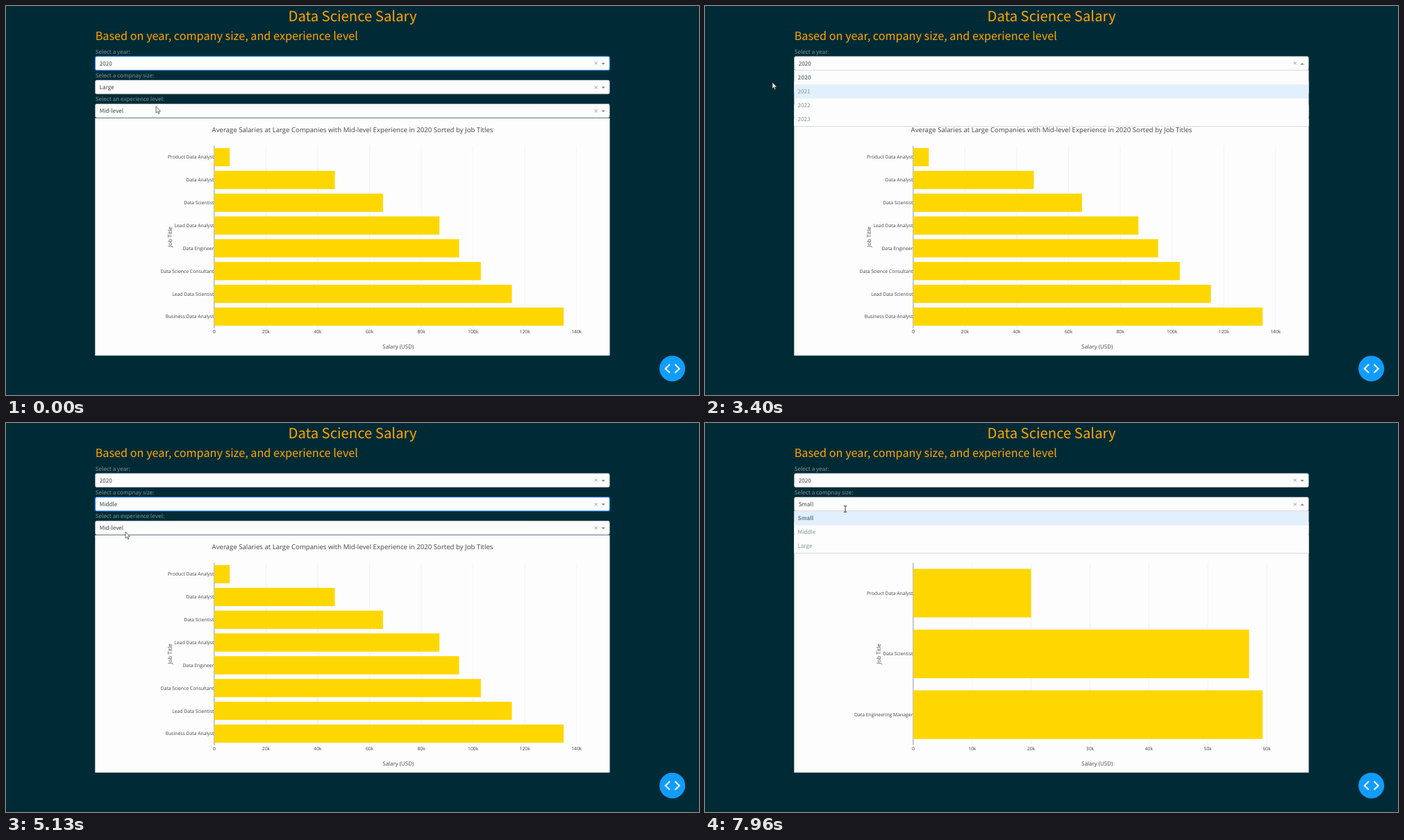
Recreate the animation shown at these times as an HTML page. Size 998 px wide and 561 px high, loop 8 s.

```html
<!DOCTYPE html>
<html lang="en">
<head>
<meta charset="utf-8">
<title>Salary dashboard</title>
<style>
  html, body { margin: 0; width: 100%; height: 100%; overflow: hidden; background: #002b36; }
  svg { display: block; width: 100%; height: 100%; }
  text { text-rendering: geometricPrecision; white-space: pre; }
  .page { font-family: "Noto Sans CJK JP", "Noto Sans CJK SC", "Noto Sans CJK", "Noto Sans", sans-serif; font-size: 8.12px; }
  .heading { fill: #ffa500; }
  .label, .option { fill: #839496; }
  .chosen { fill: #6c7f87; font-weight: 700; }
  .value { fill: #3c4347; }
  .chart { font-family: "Open Sans", sans-serif; font-size: 6.8px; fill: #444; }
  .middle { text-anchor: middle; }
  .end { text-anchor: end; }
</style>
</head>
<body>
<svg viewBox="0 0 998 561">
  <g id="scene"></g>
  <g id="cursor"></g>
</svg>
<script>
const LOOP = 8000;
const LEFT = 128.3, WIDTH = 741.2, RIGHT = LEFT + WIDTH;
const CONTROL_HEIGHT = 20.4, OPTION_HEIGHT = 20.1;
const WHITE = '#fdfdfd';

const selects = [
  { key: 'year', label: 'Select a year:', top: 72.5, options: ['2020', '2021', '2022', '2023'] },
  { key: 'size', label: 'Select a compnay size:', top: 106.75, options: ['Small', 'Middle', 'Large'] },
  { key: 'level', label: 'Select an experience level:', top: 141, options: ['Mid-level'] }
];

// Bars are [job title, average salary in thousands], top to bottom.
const charts = {
  Large: { step: 20, titleX: 239, bars: [
    ['Product Data Analyst', 6], ['Data Analyst', 46.6], ['Data Scientist', 65.2],
    ['Lead Data Analyst', 87], ['Data Engineer', 94.6], ['Data Science Consultant', 103],
    ['Lead Data Scientist', 115], ['Business Data Analyst', 135]] },
  Middle: { step: 20, titleX: 253, bars: [
    ['Data Analyst', 34], ['Data Scientist', 59], ['Data Engineer', 71],
    ['Research Scientist', 88], ['Lead Data Engineer', 104]] },
  Small: { step: 10, titleX: 253, bars: [
    ['Product Data Analyst', 20], ['Data Scientist', 57], ['Data Engineering Manager', 59.3]] }
};

const events = [
  [0, { year: '2020', size: 'Large', level: 'Mid-level', chart: 'Large', focus: 'year', open: false, hover: '' }],
  [2050, { open: true, hover: '2020' }],
  [2760, { hover: '2021' }],
  [3520, { open: false, focus: '' }],
  [3960, { focus: 'size', open: true, hover: 'Large' }],
  [4780, { hover: 'Middle' }],
  [5030, { size: 'Middle', open: false }],
  [5270, { chart: 'Middle' }],
  [5960, { open: true, hover: 'Middle' }],
  [6140, { hover: 'Small' }],
  [6330, { size: 'Small', open: false }],
  [6530, { chart: 'Small' }],
  [7760, { open: true, hover: 'Small' }]
];

// Pointer path: [time, x, y]
const path = [
  [0, 216, 145], [860, 222, 138], [1600, 249, 86], [2300, 248, 86], [2800, 205, 118],
  [3350, 97, 110], [3480, 97, 110], [3920, 184, 116], [4500, 184, 116], [4900, 173, 156],
  [5130, 172, 157], [5300, 178, 205], [5700, 178, 205], [5920, 182, 118], [6020, 182, 118],
  [6200, 184, 136], [6400, 184, 138], [6630, 185, 144], [7360, 190, 146], [7700, 202, 124], [8000, 202, 124]
];

const text = (x, y, content, cls = '', extra = '') =>
  `<text x="${x}" y="${y}" class="${cls}" ${extra}>${content}</text>`;
const rect = (x, y, w, h, fill, extra = '') =>
  `<rect x="${x}" y="${y}" width="${w}" height="${h}" fill="${fill}" ${extra}/>`;
const line = (x1, y1, x2, y2, stroke, width = 0.57) =>
  `<path d="M${x1} ${y1}L${x2} ${y2}" stroke="${stroke}" stroke-width="${width}"/>`;
const size = px => `style="font-size:${px}px"`;

function drawChart(name, year) {
  const { step, titleX, bars } = charts[name];
  const x0 = 299.9, top = 201.6, bottom = 464.4, plotWidth = 529.7;
  const max = Math.max(...bars.map(bar => bar[1])) / 0.95;
  const toX = value => x0 + value / max * plotWidth;
  const pitch = (bottom - top) / bars.length;
  let out = rect(LEFT, 161.8, WIDTH, 342.4, WHITE);
  out += text(499, 181.7, `Average Salaries at ${name} Companies with Mid-level Experience in ${year} Sorted by Job Titles`, 'middle', size(9.64));
  for (let value = 0; value < max; value += step) {
    const x = toX(value);
    out += line(x, top, x, bottom, value ? '#eaeaea' : '#444');
    out += text(x, 471.5, value ? value + 'k' : '0', 'middle');
  }
  bars.forEach(([job, salary], i) => {
    const center = top + pitch * (i + 0.5);
    out += rect(x0 + 0.2, center - pitch * 0.4, toX(salary) - x0 - 0.2, pitch * 0.8, '#ffd700');
    out += text(299.3, center + 2.4, job, 'end');
  });
  out += text(564.8, 493.8, 'Salary (USD)', 'middle', size(7.93));
  out += text(0, 0, 'Job Title', 'middle', `transform="translate(${titleX} 333) rotate(-90)" ${size(7.93)}`);
  return `<g class="chart">${out}</g>`;
}

function drawSelect(select, state) {
  const { key, label, top, options } = select;
  const focused = state.focus === key, open = focused && state.open;
  const mid = top + 10.3;
  let out = text(128.7, top - 3.9, label, 'label');
  if (focused && !open)
    out += rect(LEFT - 0.8, top - 0.8, WIDTH + 1.6, CONTROL_HEIGHT + 1.6, '#0b4a86', 'rx="2.8"');
  out += rect(LEFT + 0.3, top + 0.3, WIDTH - 0.6, CONTROL_HEIGHT - 0.6, WHITE,
    `rx="2.1" stroke="${focused && !open ? '#007eff' : '#ccc'}" stroke-width=".6"`);
  out += text(134.7, top + 13.2, state[key], 'value');
  out += text(849.7, mid + 3.6, '×', 'middle', 'style="font:10.2px \'Open Sans\',sans-serif;fill:#999"');
  out += `<path d="M857.3 ${open ? mid + 1.9 : mid - 0.9}h5.6l-2.8 ${open ? -2.8 : 2.8}z" fill="#888"/>`;
  return out;
}

function drawMenu({ key, top, options }, state) {
  const start = top + CONTROL_HEIGHT;
  const height = options.length * OPTION_HEIGHT + 0.4;
  let out = rect(LEFT, start - 0.5, WIDTH, height + 0.5, WHITE);
  options.forEach((option, i) => {
    const y = start + i * OPTION_HEIGHT;
    if (option === state.hover) out += rect(LEFT + 0.5, y + 0.2, WIDTH - 1, OPTION_HEIGHT, '#e1f0fc');
    out += text(133.6, y + 13.1, option, option === state[key] ? 'chosen' : 'option');
  });
  out += line(LEFT, start, RIGHT, start, '#e0e0e0');
  out += line(LEFT, start + height, RIGHT, start + height, '#bbb');
  return out;
}

function drawScene(state) {
  const opened = state.open && selects.find(select => select.key === state.focus);
  return drawChart(state.chart, state.year) +
    '<g class="page">' +
    text(499, 21.5, 'Data Science Salary', 'heading middle', size(20.3)) +
    text(128.7, 49.3, 'Based on year, company size, and experience level', 'heading', size(16.24)) +
    selects.map(select => drawSelect(select, state)).join('') +
    (opened ? drawMenu(opened, state) : '') +
    '</g>' +
    '<circle cx="959.6" cy="522.9" r="18.5" fill="#119dff"/>' +
    '<path d="M956 516.8l-6.3 6.1l6.3 6.1M963.4 516.8l6.3 6.1l-6.3 6.1" fill="none" stroke="#fff" stroke-width="2.1"/>';
}

const shapes = {
  arrow: '<path d="M0 0V9.2L2.1 7.3L3.6 10.5L5 9.9L3.6 6.8H6.5Z" fill="#fff" stroke="#222" stroke-width=".65"/>',
  beam: '<path d="M-2.2 -4.3H-.6L0 -3.8L.6 -4.3H2.2M0 -3.8V3.8M-2.2 4.3H-.6L0 3.8L.6 4.3H2.2" fill="none" stroke="#222" stroke-width=".9"/>'
};

function pointerAt(t) {
  const i = path.findIndex(point => point[0] > t);
  const [t0, x0, y0] = path[i - 1], [t1, x1, y1] = path[i];
  const u = (t - t0) / (t1 - t0), ease = u * u * (3 - 2 * u);
  return [x0 + (x1 - x0) * ease, y0 + (y1 - y0) * ease];
}

const scene = document.getElementById('scene');
const cursor = document.getElementById('cursor');
let drawnState = '';

function render() {
  const t = performance.now() % LOOP;
  const state = Object.assign({}, ...events.filter(event => event[0] <= t).map(event => event[1]));
  const stateKey = JSON.stringify(state);
  if (stateKey !== drawnState) {
    scene.innerHTML = drawScene(state);
    drawnState = stateKey;
  }
  const [x, y] = pointerAt(t);
  // Only the focused control shows a text cursor.
  const active = selects.find(select => select.key === state.focus);
  const typing = active && x > LEFT && y > active.top && y < active.top + CONTROL_HEIGHT;
  cursor.innerHTML = shapes[typing ? 'beam' : 'arrow'];
  cursor.setAttribute('transform', `translate(${x} ${y})`);
  requestAnimationFrame(render);
}
render();
</script>
</body>
</html>
```
